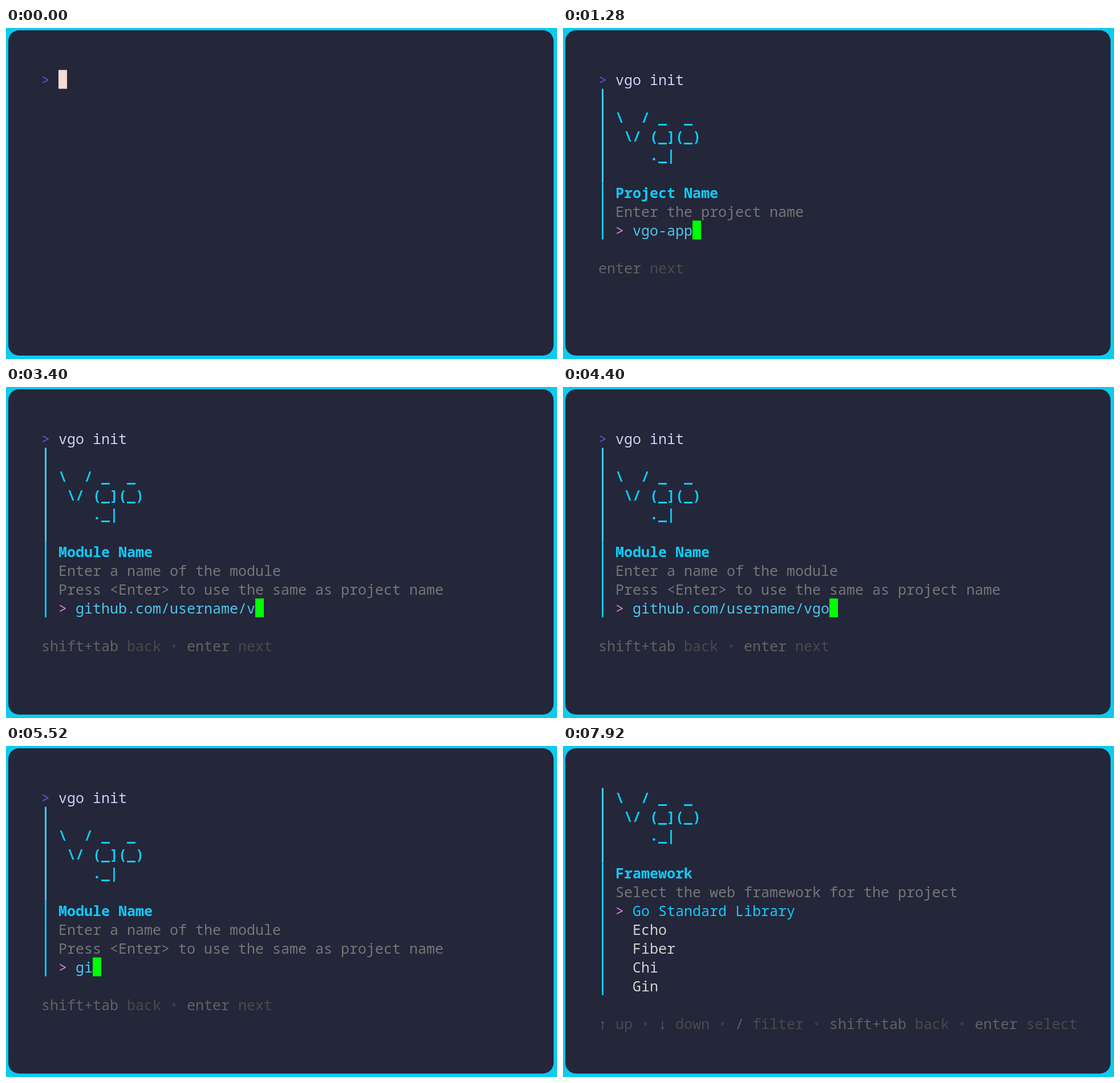
These frames come from a looping animation (966x580 px, 8 s). An HTML page with a canvas:

```html
<!DOCTYPE html>
<html lang="en">
<head>
<meta charset="utf-8">
<title>Terminal form</title>
<style>
html, body { margin: 0; width: 100%; height: 100%; overflow: hidden; background: #0ccbef; }
canvas { display: block; }
</style>
</head>
<body>
<canvas id="stage" width="966" height="580"></canvas>
<script>
const ctx = document.getElementById('stage').getContext('2d');
const LOOP = 8000, FRAME = 40;
const LEFT = 62, TOP = 73.5, COL = 15, ROW = 33;
const CYAN = '#0fcbf8', PINK = '#dc84d8', GREY = '#767676', INPUT = '#4cc6e8';
const KEY = '#626262', HINT = '#4a4a4a', DOT = '#3c3c3c';

const COMMAND = 'vgo init', PROJECT = 'vgo-app', MODULE = 'github.com/username/vgo-app';
const LOGO = ['\\  / _  _', ' \\/ (_](_)', '    ._|'];
const OPTIONS = ['Go Standard Library', 'Echo', 'Fiber', 'Chi', 'Gin'];
// Each move shifts the selection; the first four go down, the rest go up.
const MOVES = [6200, 6400, 6680, 6920, 7160, 7400, 7640, 7920];

function text(str, col, row, color, bold) {
  ctx.font = (bold ? 'bold ' : '') + '25px "Noto Sans Mono", monospace';
  ctx.fillStyle = color;
  ctx.fillText(str, LEFT + col * COL, 100 + row * ROW);
}

function block(col, row, color) {
  ctx.fillStyle = color;
  ctx.fillRect(LEFT + col * COL, TOP + row * ROW, COL, ROW);
}

function bar(from, to, color) {
  ctx.fillStyle = color;
  ctx.fillRect(68, TOP + from * ROW, 3, (to - from) * ROW);
}

// Keys pressed by time t, the first at start and then one per gap
function keys(t, start, gap, max) {
  return Math.max(0, Math.min(max, Math.floor((t - start) / gap) + 1));
}

function header(row, title, notes, end) {
  bar(Math.max(0, row - 1), row + 4, '#3cc8ee');
  bar(row + 4, end, '#0cc5f0');
  LOGO.forEach((line, i) => text(line, 2, row + i, '#08d0fb', true));
  text(title, 2, row + 4, CYAN, true);
  notes.forEach((line, i) => text(line, 2, row + 5 + i, GREY));
}

function input(value, row, cursorOn) {
  text('>', 2, row, PINK);
  text(value, 4, row, INPUT);
  if (cursorOn) block(4 + value.length, row, '#00ff00');
}

function help(row, items) {
  let col = 0;
  items.forEach(([key, hint], i) => {
    if (i) {
      text('•', col + 1, row, DOT);
      col += 3;
    }
    text(key, col, row, KEY);
    text(hint, col + key.length + 1, row, HINT);
    col += key.length + 1 + hint.length;
  });
}

function prompt(t) {
  const typed = COMMAND.slice(0, keys(t, 15, 53.3, COMMAND.length));
  text('>', 0, 0, '#5b56e0');
  text(typed, 2, 0, '#cad3f5');
  if (t < 960) block(2 + typed.length, 0, '#f4dbd6');
}

function project(t) {
  header(2, 'Project Name', ['Enter the project name'], 9);
  input(PROJECT.slice(0, keys(t, 945, 53.3, PROJECT.length)), 8, t < 1800);
  help(10, [['enter', 'next']]);
}

function module(t) {
  const size = keys(t, 2301.8, 53.3, MODULE.length) - keys(t, 4237, 52, MODULE.length);
  const hidden = (t >= 4200 && t < 4240) || t >= 6120;
  header(2, 'Module Name', [
    'Enter a name of the module',
    'Press <Enter> to use the same as project name'
  ], 10);
  input(MODULE.slice(0, size), 9, !hidden);
  help(11, [['shift+tab', 'back'], ['enter', 'next']]);
}

function framework(t) {
  const moves = MOVES.filter(m => t >= m).length;
  const selected = 4 - Math.abs(4 - moves);
  header(0, 'Framework', ['Select the web framework for the project'], 11);
  OPTIONS.forEach((name, i) => text(name, 4, 6 + i, i === selected ? CYAN : '#d0d0d0'));
  text('>', 2, 6 + selected, PINK);
  help(12, [['↑', 'up'], ['↓', 'down'], ['/', 'filter'], ['shift+tab', 'back'], ['enter', 'select']]);
}

function draw(now) {
  const t = Math.floor((now % LOOP) / FRAME) * FRAME;
  ctx.fillStyle = '#0ccbef';
  ctx.fillRect(0, 0, 966, 580);
  ctx.fillStyle = '#24263a';
  ctx.beginPath();
  ctx.roundRect(4, 4, 956, 570, 19);
  ctx.fill();

  if (t < 6160) prompt(t);
  if (t >= 6160) framework(t);
  else if (t >= 2280) module(t);
  else if (t >= 960) project(t);
  requestAnimationFrame(draw);
}
draw(performance.now());
</script>
</body>
</html>
```
